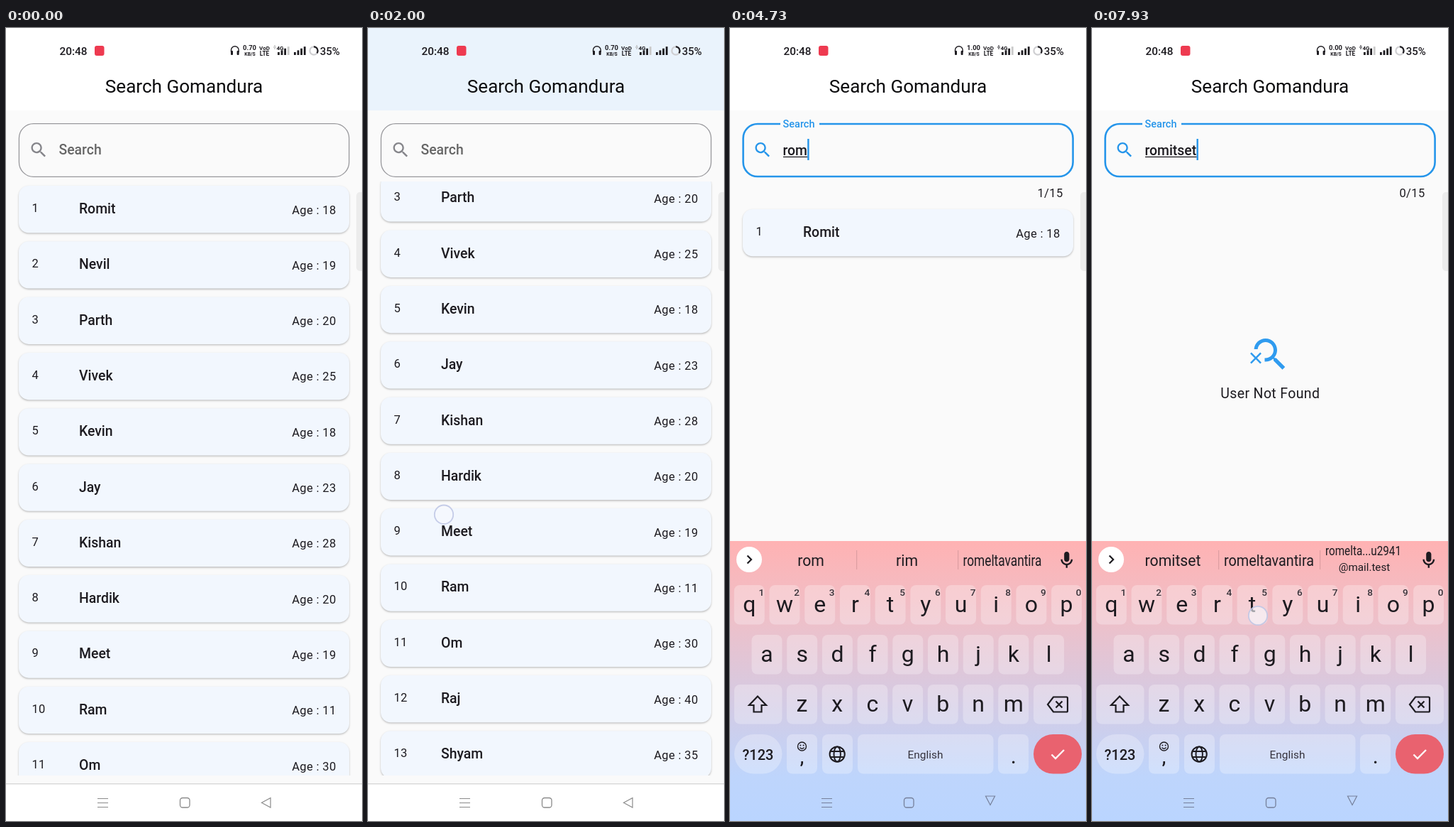
Write an HTML page with a canvas that moves like this. It is 502 px wide and 1116 px high and loops after 8 s.

```html
<!DOCTYPE html>
<html lang="en">
<head>
<meta charset="utf-8">
<title>Search list</title>
<style>
html, body { margin: 0; width: 100%; height: 100%; overflow: hidden; background: #fafafa; }
canvas { display: block; width: 502px; height: 1116px; }
</style>
</head>
<body>
<canvas id="stage"></canvas>
<script>
const W = 502, H = 1116, LOOP = 8000, FPS = 15;
const canvas = document.getElementById('stage');
const ratio = window.devicePixelRatio || 1;
canvas.width = W * ratio;
canvas.height = H * ratio;
const c = canvas.getContext('2d');

const INK = '#1d1b20', BLUE = '#2595ea', PAGE = '#fafafa', GREY = '#666';
const SIZE = 19.4, SMALL = 16.5, PITCH = 78.3;
const FOCUS = 2530, BLINK = 490;

const people = [
  ['Romit', 18], ['Nevil', 19], ['Parth', 20], ['Vivek', 25], ['Kevin', 18],
  ['Jay', 23], ['Kishan', 28], ['Hardik', 20], ['Meet', 19], ['Ram', 11],
  ['Om', 30], ['Raj', 40], ['Shyam', 35], ['Dev', 22], ['Yash', 27]
].map(([name, age], i) => ({ id: i + 1, name, age }));

// time, letter, touch position
const taps = [
  [3930, 'r', 178, 822], [4270, 'o', 425, 822], [4600, 'm', 392, 954],
  [5200, 'i', 378, 822], [5430, 't', 230, 826],
  [7470, 's', 104, 890], [7700, 'e', 131, 822], [7900, 't', 234, 827]
];
const scrollKeys = [
  [930, 0], [1000, 12], [1070, 38], [1200, 91.5], [1400, 170], [1600, 232],
  [1750, 248], [1900, 222], [2000, 172.3], [2066, 0]
];
const USER = 'romeltavantira';
const guesses = {
  r: ['r', 'are', 'or'], ro: ['ro', 'to', 'room'], rom: ['rom', 'rim', USER],
  romi: ['romi', 'Romi', USER], romit: ['romit', USER, 'Romit']
};

const searchIcon = 'M15.5 14h-.79l-.28-.27C15.41 12.59 16 11.11 16 9.5 16 5.91 13.09 3 9.5 3S3 5.91 3 9.5 5.91 16 9.5 16c1.61 0 3.09-.59 4.23-1.57l.27.28v.79l5 4.99L20.49 19l-4.99-5zm-6 0C7.01 14 5 11.99 5 9.5S7.01 5 9.5 5 14 7.01 14 9.5 11.99 14 9.5 14z';
const missIcon = 'M15.5 14h-.79l-.28-.27C15.41 12.59 16 11.11 16 9.5 16 5.91 13.09 3 9.5 3 6.08 3 3.28 5.64 3.03 9h2.02C5.3 6.75 7.18 5 9.5 5 11.99 5 14 7.01 14 9.5S11.99 14 9.5 14c-.17 0-.33-.03-.5-.05v2.02c.17.02.33.03.5.03 1.61 0 3.09-.59 4.23-1.57l.27.28v.79l5 4.99L20.49 19zM6.47 10.82L4 13.29l-2.47-2.47-.71.71L3.29 14 .82 16.47l.71.71L4 14.71l2.47 2.47.71-.71L4.71 14l2.47-2.47z';
const micIcon = 'M12 14c1.66 0 3-1.34 3-3V5c0-1.66-1.34-3-3-3S9 3.34 9 5v6c0 1.66 1.34 3 3 3zM17 11c0 2.76-2.24 5-5 5s-5-2.24-5-5H5c0 3.53 2.61 6.43 6 6.92V21h2v-3.08c3.39-.49 6-3.39 6-6.92z';

const clamp = v => Math.min(1, Math.max(0, v));
const easeOut = v => 1 - (1 - clamp(v)) ** 3;
const mix = (a, b, p) => a + (b - a) * p;

function track(keys, t) {
  for (let i = 1; i < keys.length; i++) {
    const [t0, a] = keys[i - 1], [t1, b] = keys[i];
    if (t < t1) return mix(a, b, clamp((t - t0) / (t1 - t0)));
  }
  return keys[keys.length - 1][1];
}

function text(s, x, y, size, { weight = 400, color = INK, align = 'left', gap = 0, max } = {}) {
  c.font = `${weight} ${size}px Roboto, sans-serif`;
  c.letterSpacing = gap + 'px';
  c.textAlign = align;
  c.fillStyle = color;
  max ? c.fillText(s, x, y, max) : c.fillText(s, x, y);
  return c.measureText(s).width;
}
function rect(x, y, w, h, color) {
  c.fillStyle = color;
  c.fillRect(x, y, w, h);
}
function box(x, y, w, h, r, color, line) {
  c.beginPath();
  c.roundRect(x, y, w, h, r);
  paint(color, line);
}
function disc(x, y, r, color, line) {
  c.beginPath();
  c.arc(x, y, r, 0, 7);
  paint(color, line);
}
function paint(color, line) {
  if (line) {
    c.lineWidth = line;
    c.strokeStyle = color;
    c.stroke();
  } else {
    c.fillStyle = color;
    c.fill();
  }
}
function stroke(d, color, width) {
  c.lineWidth = width;
  c.strokeStyle = color;
  c.stroke(new Path2D(d));
}
function icon(d, x, y, scale, color) {
  c.save();
  c.translate(x, y);
  c.scale(scale, scale);
  c.fillStyle = color;
  c.fill(new Path2D(d));
  c.restore();
}

function statusBar(t) {
  const tiny = { weight: 700, align: 'center' };
  const rate = t < 2860 ? '0.70' : t < 7130 ? '1.00' : '0.00';
  text('20:48', 75.5, 37.5, 15.4, { weight: 500 });
  box(125, 25, 13.5, 14, 3, '#ee3a50');
  stroke('M317.5 34V31a5.3 5.3 0 0 1 10.6 0V34', INK, 1.4);
  box(317, 32, 3, 6, 1, INK);
  box(325.6, 32, 3, 6, 1, INK);
  text(rate, 343.5, 31, 9.4, tiny);
  text('KB/S', 344, 39, 6.8, tiny);
  text('VoD', 364.5, 31, 8, tiny);
  text('LTE', 364.5, 39, 8.4, tiny);
  text('4G', 386.5, 30.5, 8, tiny);
  stroke('M377 27h4M379 24v2M379 28v2', t < 2860 ? '#aaa' : INK, 1);
  for (let i = 0; i < 4; i++) {
    const h = 4 + i * 2.6;
    rect(383 + i * 4.6, 38 - h, 2.8, h, i < 3 ? INK : '#c9c9c9');
    rect(406 + i * 4.6, 38 - h, 2.8, h, INK);
  }
  disc(434, 32, 5.6, '#cfcfd2', 2.2);
  c.beginPath();
  c.arc(434, 32, 5.6, -1.57, 0.63);
  paint(INK, 2.2);
  text('35%', 442.8, 37.5, 15, { weight: 500 });
}

function header(t, scroll) {
  rect(0, 0, W, 116, scroll > 0 ? '#eaf3fc' : '#fff');
  statusBar(t);
  text('Search Gomandura', 251, 91, 26.1, { color: '#0c0c0e', align: 'center' });
}

function card(p, y) {
  c.save();
  c.shadowColor = 'rgba(0,0,0,.25)';
  c.shadowBlur = 2.6 * ratio;
  c.shadowOffsetY = 1.3 * ratio;
  box(18, y, 466, 66.3, 14, '#f2f7fe');
  c.restore();
  text(p.id, 36.5, y + 37, SMALL, { gap: .35 });
  text(p.name, 103, y + 39, SIZE, { weight: 500 });
  text('Age : ' + p.age, 465.5, y + 39.5, SMALL, { align: 'right', gap: .35 });
}

function list(query, scroll, bottom) {
  const found = people.filter(p => `${p.id} ${p.name} ${p.age}`.toLowerCase().includes(query));
  const shift = query ? 33 : 0;
  if (query) text(`${found.length}/15`, 469.5, 237.5, SMALL, { align: 'right', gap: .35 });
  c.save();
  c.beginPath();
  c.rect(0, 216 + shift, W, bottom - 216 - shift);
  c.clip();
  found.forEach((p, i) => {
    const y = 222 + shift + i * PITCH - scroll;
    if (y > 130 && y < bottom) card(p, y);
  });
  c.restore();
  if (!found.length) {
    icon(missIcon, 221, 429.5, 2.5, '#2f9bef');
    text('User Not Found', 251.3, 521, 19.5, { align: 'center', gap: .35 });
  }
}

function searchField(t, query) {
  const focused = t >= FOCUS;
  const p = easeOut((t - FOCUS) / 200);
  rect(0, 116, W, 95, PAGE);
  if (focused) box(18.6, 135, 465, 74, 20.2, BLUE, 2.6);
  else box(18.4, 134.6, 465.4, 74.8, 20.6, '#98989c', 1.3);
  if (p > 0) rect(98.5 - 27.5 * p, 131, 55 * p, 8, PAGE);
  icon(searchIcon, 32, 157.5, 1.17, focused ? BLUE : '#85858a');
  text('Search', 74.5, mix(178, 139.5, p), mix(SIZE, 14.5, p), { weight: 500, color: focused ? BLUE : GREY });
  if (!focused) return;

  let end = 74.8;
  if (query) {
    const w = text(query, 74.5, 179, SIZE, { weight: 500 });
    rect(75, 180.8, w, 1.3, INK);
    end += w;
  } else {
    c.globalAlpha = clamp((t - FOCUS - 60) / 250);
    text('Search id, name and age hear', 74.5, 178.5, SIZE, { weight: 500, color: GREY });
    c.globalAlpha = 1;
  }
  const last = taps.reduce((a, k) => t >= k[0] ? k[0] : a, 2750);
  if (Math.floor(Math.max(0, t - last) / BLINK) % 2 === 0) rect(end, 156, 2.4, 30, BLUE);
}

function toolbar() {
  // palette
  disc(99, 748, 10.8, INK);
  for (const a of [-2.8, -2, -1.1, -.3]) disc(99 + 6.4 * Math.cos(a), 748 + 6.4 * Math.sin(a), 1.9, '#fcb5b7');
  disc(106, 757, 4.6, '#fcb5b7');
  // sticker
  stroke('M163 738.5h16q2.5 0 2.5 2.5v11l-6.5 6.5h-12q-2.5 0-2.5-2.5v-15q0-2.5 2.5-2.5zM181 751.5h-4q-2.5 0-2.5 2.5v4M166.5 749.5q4.5 4.5 8 0', INK, 2.2);
  disc(167, 744.5, 1.7, INK);
  disc(175, 744.5, 1.7, INK);
  text('GIF', 243, 755, 19, { weight: 900, align: 'center', gap: .4 });
  // gear
  for (let i = 0; i < 8; i++) {
    c.save();
    c.translate(315.5, 748);
    c.rotate(i * Math.PI / 4);
    box(-2.7, -11, 5.4, 6, 1, INK);
    c.restore();
  }
  disc(315.5, 748, 6.4, INK, 4.4);
  rect(358.6, 736, 1.3, 26, '#d99da1');
  for (let i = -1; i < 2; i++) disc(403 + i * 7.5, 748, 2.3, INK);
}

function suggestions(query) {
  const words = guesses[query] || [query, USER, null];
  const put = (s, x, y, size, max) => text(s, x, y, size, { align: 'center', max });
  for (const x of [178, 321]) rect(x, 735, 1.2, 27, '#dd9ea2');
  put(words[0], 114, 757, 21.2, 111);
  put(words[1], 249.5, 757, 21.2, 127);
  if (words[2]) put(words[2], 384, 757, 21.2, 111);
  else {
    put('romelta...u2941', 382.5, 742, 18.5, 107);
    put('@mail.test', 384, 764, 15.2);
  }
}

function keyboard(query) {
  const sky = c.createLinearGradient(0, 722, 0, H);
  sky.addColorStop(0, '#ffb2b3');
  sky.addColorStop(.28, '#eec0c9');
  sky.addColorStop(.58, '#d4cbe4');
  sky.addColorStop(.84, '#bed5fc');
  sky.addColorStop(1, '#bad5ff');
  rect(0, 722, W, H - 722, sky);

  disc(27, 748, 18, '#fff');
  stroke(query ? 'M24.5 742.5l5.5 5.5-5.5 5.5' : 'M29.5 742.5l-5.5 5.5 5.5 5.5', INK, 2.2);
  query ? suggestions(query) : toolbar();
  icon(micIcon, 460.4, 734.5, 1.2, INK);

  const key = (x, y, w, r = 8) => box(x, y, w, 55.5, r, 'rgba(255,255,255,.27)');
  [['qwertyuiop', 27.3], ['asdfghjkl', 52], ['zxcvbnm', 101.5]].forEach(([row, x0], j) => {
    const y = 784 + j * 70;
    [...row].forEach((ch, i) => {
      const x = x0 + i * 49.7;
      key(x - 21.5, y, 43);
      text(ch, x, y + 37.5, 32, { align: 'center' });
      if (!j) text((i + 1) % 10, x + 17, 799, 13.6, { weight: 500, align: 'center', color: '#38333a' });
    });
  });

  key(6, 924, 67.5);
  key(428, 924, 68);
  stroke('M39 940.5l-12 12.5h6.5v9.5h11v-9.5h6.5z', INK, 2.2);
  stroke('M456 941.5h18.5q1.5 0 1.5 1.5v18q0 1.5-1.5 1.5H456l-8-10.5zM459.5 947.5l9 9M468.5 947.5l-9 9', INK, 2.2);

  key(6, 994, 67.5, 27.7);
  text('?123', 39.5, 1029.5, 20, { weight: 500, align: 'center' });
  key(80, 994, 43);
  disc(101.5, 1011, 6, INK, 1.4);
  disc(99.4, 1009.4, 1, INK);
  disc(103.6, 1009.4, 1, INK);
  stroke('M98.5 1012.5q3 3.5 6 0', INK, 1.3);
  text(',', 101.5, 1035, 25, { weight: 500, align: 'center' });
  key(130, 994, 43);
  disc(151.2, 1022, 10.6, INK, 2);
  c.beginPath();
  c.ellipse(151.2, 1022, 4.7, 10.6, 0, 0, 7);
  paint(INK, 1.9);
  stroke('M142 1018h18.5M142 1026h18.5', INK, 1.9);
  key(180, 994, 191.5);
  text('English', 275.5, 1028, 15.4, { align: 'center', color: '#35323c' });
  key(378, 994, 43);
  text('.', 399.7, 1035, 25, { weight: 500, align: 'center' });
  box(428, 994, 68, 55.5, 27.7, '#e9626f');
  stroke('M453.5 1022.5l5.5 5.5 12-12', '#fff', 2.4);
}

function navIcons(open) {
  const color = open ? '#76809a' : '#8a8a8a';
  stroke('M129 1084.5h15M129 1090.5h15M129 1096.5h15', color, 1.2);
  box(245.5, 1083.5, 13.5, 13.5, 3.5, color, 1.3);
  stroke(open ? 'M360.5 1081h13l-6.5 12.5z' : 'M373 1083.5v13.5l-12.5-6.7z', color, 1.2);
}

function touch(x, y, alpha = 1) {
  c.globalAlpha = alpha;
  disc(x, y, 13.5, 'rgba(247,248,253,.62)');
  disc(x, y, 13.2, 'rgba(188,196,228,.85)', 1.8);
  c.globalAlpha = 1;
}

function touches(t, scroll) {
  if (t > 930 && t < 2060) {
    const p = (t - 1200) / 800;
    touch(130 - 23 * p, 869.5 - 12.5 * p - scroll);
  }
  if (t > 2395 && t < 2600) touch(262, 176, t < 2530 ? 1 : .5);
  for (const [at, , x, y] of taps) {
    if (t > at - 70 && t < at + 130) touch(x, y, t < at + 70 ? 1 : .5);
  }
}

function draw(t) {
  const scroll = track(scrollKeys, t);
  const query = taps.filter(k => t >= k[0]).map(k => k[1]).join('');
  const rise = easeOut((t - 2600) / 560);
  const top = H - 394 * rise;

  c.setTransform(ratio, 0, 0, ratio, 0, 0);
  rect(0, 0, W, H, PAGE);
  list(query, scroll, Math.min(1064, top) - 12);
  searchField(t, query);
  header(t, scroll);
  box(494, 231, 12, 111, 5, '#ececec');

  rect(0, 1063, W, 53, '#fff');
  rect(0, 1063, W, 1.4, '#d8d8d8');
  if (rise > 0) {
    c.save();
    c.translate(0, top - 722);
    keyboard(query);
    c.restore();
  }
  navIcons(rise > .2);
  touches(t, scroll);
}

const start = performance.now();
function frame(now) {
  const t = Math.max(0, now - start) % LOOP;
  draw(Math.floor((t + 4) * FPS / 1000) * 1000 / FPS);
  requestAnimationFrame(frame);
}
requestAnimationFrame(frame);
</script>
</body>
</html>
```
